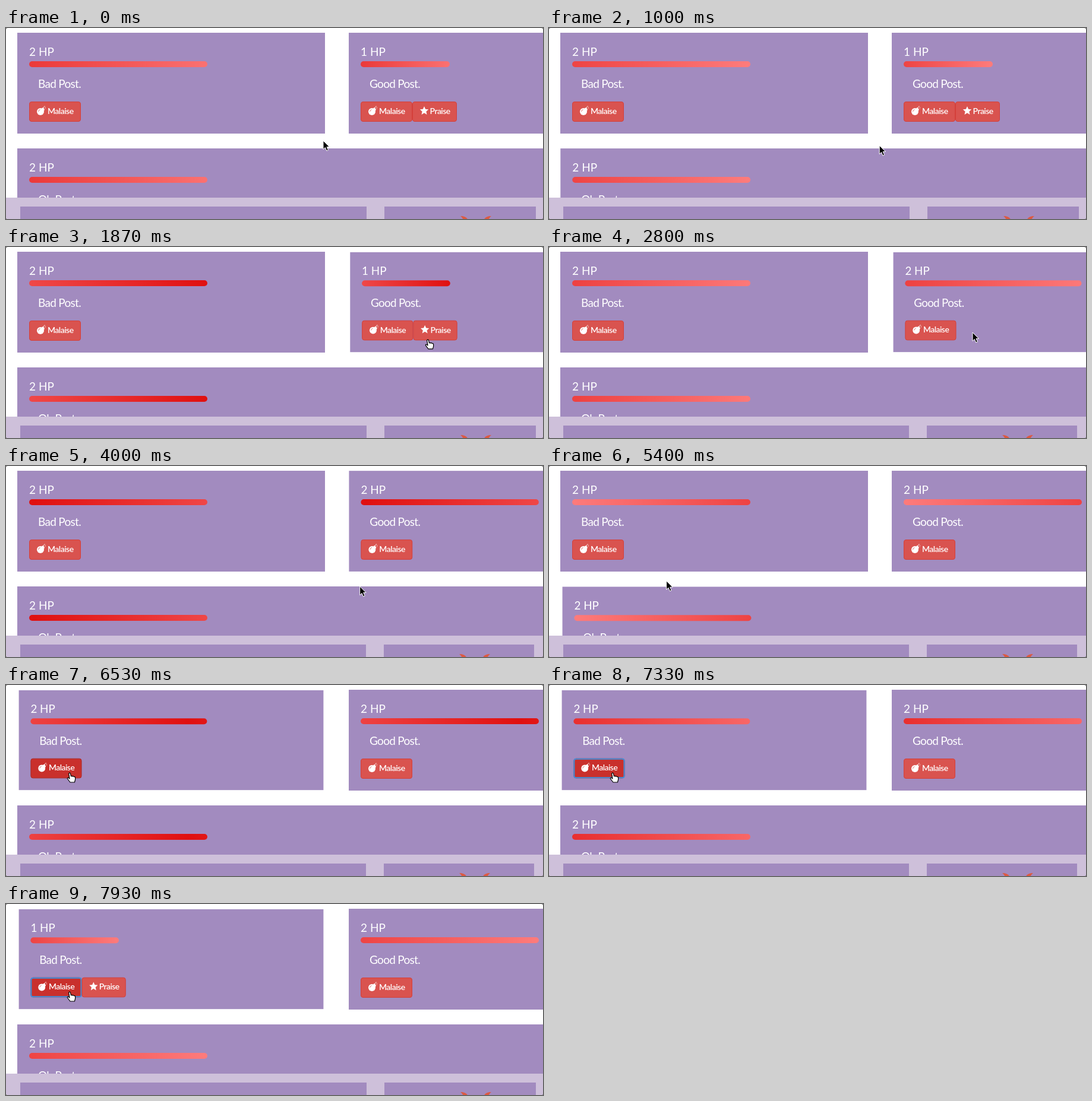
Write an HTML page that moves like this. It is 904 px wide and 322 px high and loops after 8000 ms.

```html
<!DOCTYPE html>
<html lang="en">
<head>
<meta charset="utf-8">
<title>Post health</title>
<style>
  html, body { margin: 0; width: 100%; height: 100%; overflow: hidden; background: #666; }
  #stage { position: relative; width: 904px; height: 322px; overflow: hidden; background: #fff;
    border-radius: 3px; color: #fff; font: 19px/23px Lato, "Open Sans", sans-serif; }
  #stage div, #stage svg { position: absolute; }
  .card { height: 170px; background: #a28bbf; }
  .hp { left: 20px; top: 20px; white-space: pre; }
  .bar { left: 20px; top: 48px; height: 10px; border-radius: 5px;
    background: linear-gradient(90deg, #ff8080, #e01010, #ff8080) 0 50% / 400% 100%; }
  .post { left: 35px; top: 74px; white-space: pre; letter-spacing: -.7px; }
  .button { top: 116px; height: 34px; box-sizing: border-box; border: 1px solid #d43f3a;
    border-radius: 4px; background: #d9534f; font-size: 14px; line-height: 17px;
    font-weight: 600; letter-spacing: -.55px; }
  .button.hot { background: #c9302c; border-color: #ac2925; }
  .button.focus { outline: 2px solid #3f8fdc; outline-offset: -2px; }
  .button span { position: absolute; left: 30px; top: 6px; }
  .button svg { left: 11px; top: 6px; }
  .malaise { left: 20px; width: 87px; }
  .praise { left: 106.5px; width: 75px; }
  .praise span { left: 29px; }
  #dock { left: 0; top: 286px; width: 904px; height: 36px; background: #cec0da; }
  .panel { top: 15px; height: 30px; background: #a28bbf; }
  #cursor { left: 0; top: 0; overflow: visible; }
</style>
</head>
<body>
<div id="stage">
  <div id="dock">
    <div class="panel" id="left" style="left:24px"></div>
    <div class="panel" id="right"></div>
    <svg id="horns" width="56" height="8" style="top:30px" fill="#dc5a42">
      <path d="M1 1Q11 1 14 8H6Q5 4 1 1ZM53 1Q43 1 40 8H48Q49 4 53 1Z"/>
    </svg>
  </div>
  <svg id="cursor" width="20" height="20">
    <path id="arrow" d="M0 0V14.5L3.4 11.4 5.7 17 8.4 15.9 6 10.4H10.4Z" fill="#000" stroke="#fff"/>
    <path id="hand" d="M-1.4 1.4Q0 -1 1.4 1.2L2.4 6Q4 4.6 5 6.2 6.4 5 7.4 6.8 9.4 6 9.6 8.4V11.5L8.4 16H1L-3.6 10Q-4 8 -2 8.4L0 10Z" fill="#fff" stroke="#000" stroke-width="1.2" stroke-linejoin="round"/>
  </svg>
</div>
<script>
const LOOP = 8000, PRAISED = 2690, BLAMED = 7450;
const $ = id => document.getElementById(id);

const icons = {
  malaise: `<circle cx="7" cy="10" r="6"/><path d="M9 4l3-1 2 4-2 2z"/>
    <path d="M11.5 3.5l2-2M14 .5v1.2M15.8 3h-1M15.4 5l-.8-.6" stroke="#fff"/>
    <path d="M3.5 10Q4 7 6.5 6.5" fill="none" stroke="#d9534f" stroke-width=".8"/>`,
  praise: `<path d="M8 1L10.1 5.8 15.2 6.3 11.4 9.8 12.5 15 8 12.3 3.5 15 4.6 9.8 .8 6.3 5.9 5.8Z"/>`
};
const button = (kind, label) =>
  `<div class="button ${kind}"><svg width="17" height="17" fill="#fff">${icons[kind]}</svg><span>${label}</span></div>`;

function makeCard(x, y, width, post) {
  const el = document.createElement('div');
  el.className = 'card';
  el.style.cssText = `left:${x}px;top:${y}px;width:${width}px`;
  el.innerHTML = `<div class="hp"></div><div class="bar"></div><div class="post">${post}</div>`
    + button('malaise', 'Malaise') + button('praise', 'Praise');
  $('stage').insertBefore(el, $('dock'));
  const part = name => el.querySelector('.' + name);
  return { el, hp: part('hp'), bar: part('bar'), malaise: part('malaise'), praise: part('praise') };
}
const bad = makeCard(19, 8, 518, 'Bad Post.');
const good = makeCard(577, 8, 518, 'Good Post.');
const oh = makeCard(19, 203, 1076, 'Oh Post.');
const cards = [bad, good, oh];

const within = (t, from, to = LOOP) => t >= from && t < to;

// cubic-bezier(.25, .1, .25, 1)
function ease(x) {
  if (x <= 0) return 0;
  if (x >= 1) return 1;
  const curve = (u, a, b) => 3 * (1 - u) ** 2 * u * a + 3 * (1 - u) * u * u * b + u ** 3;
  let low = 0, high = 1;
  for (let i = 0; i < 20; i++) {
    const mid = (low + high) / 2;
    if (curve(mid, .25, .25) < x) low = mid; else high = mid;
  }
  return curve(low, .1, 1);
}

const hover = (t, from, to = Infinity) => ease((t - from) / 300) - ease((t - to) / 300);

// time, x, y
const path = [
  [0, 534, 190], [900, 534, 190], [1200, 600, 214], [1500, 680, 204], [1690, 704, 178],
  [1870, 710, 156], [2050, 713, 144], [3400, 713, 144], [3840, 640, 178], [4000, 596, 203],
  [4300, 500, 225], [5000, 300, 225], [5335, 212, 203], [5400, 198, 194], [5520, 160, 176],
  [5700, 118, 156], [5900, 107, 148], [LOOP, 107, 148]
];
function pointer(t) {
  const i = path.findIndex(step => step[0] > t);
  const [t0, x0, y0] = path[i - 1], [t1, x1, y1] = path[i];
  const k = (t - t0) / (t1 - t0);
  return [x0 + (x1 - x0) * k, y0 + (y1 - y0) * k];
}

function setHealth(card, hp) {
  card.hp.textContent = hp + ' HP';
  card.bar.style.width = hp * 150 + 'px';
  card.praise.style.display = hp < 2 ? '' : 'none';
}

function render(t) {
  setHealth(bad, t < BLAMED ? 2 : 1);
  setHealth(good, t < PRAISED ? 1 : 2);
  setHealth(oh, 2);

  // the gradient sweeps there and back in 5 s, skipping ahead once
  const phase = (t < PRAISED ? t / 2500 + .64 : (t - 950) / 2500) % 2;
  const sweep = phase < 1 ? ease(phase) : 1 - ease(phase - 1);
  for (const { bar } of cards) bar.style.backgroundPosition = sweep * 100 + '% 50%';

  const lifts = [
    hover(t, 5520),
    hover(t, 1690, 3840),
    hover(t, 980, 1520) + hover(t, 4010, 5335)
  ];
  cards.forEach((card, i) => card.el.style.transform = `scale(${1 - .01 * lifts[i]})`);

  bad.malaise.classList.toggle('hot', within(t, 5700));
  bad.malaise.classList.toggle('focus', within(t, 7060));
  good.praise.classList.toggle('hot', within(t, 1900, PRAISED));
  good.praise.classList.toggle('focus', within(t, 2400, PRAISED));

  const narrow = within(t, PRAISED, BLAMED);
  $('left').style.width = (narrow ? 582 : 583) + 'px';
  $('right').style.left = (narrow ? 636 : 637) + 'px';
  $('right').style.width = (narrow ? 253 : 255) + 'px';
  $('horns').style.left = (narrow ? 762 : 763.5) + 'px';

  const [x, y] = pointer(t);
  const pointing = within(t, 1850, PRAISED) || within(t, 5700);
  $('cursor').style.transform = `translate(${x}px, ${y}px)`;
  $('arrow').style.display = pointing ? 'none' : '';
  $('hand').style.display = pointing ? '' : 'none';
}

const start = performance.now();
function frame() {
  render((performance.now() - start) % LOOP);
  requestAnimationFrame(frame);
}
frame();
</script>
</body>
</html>
```
